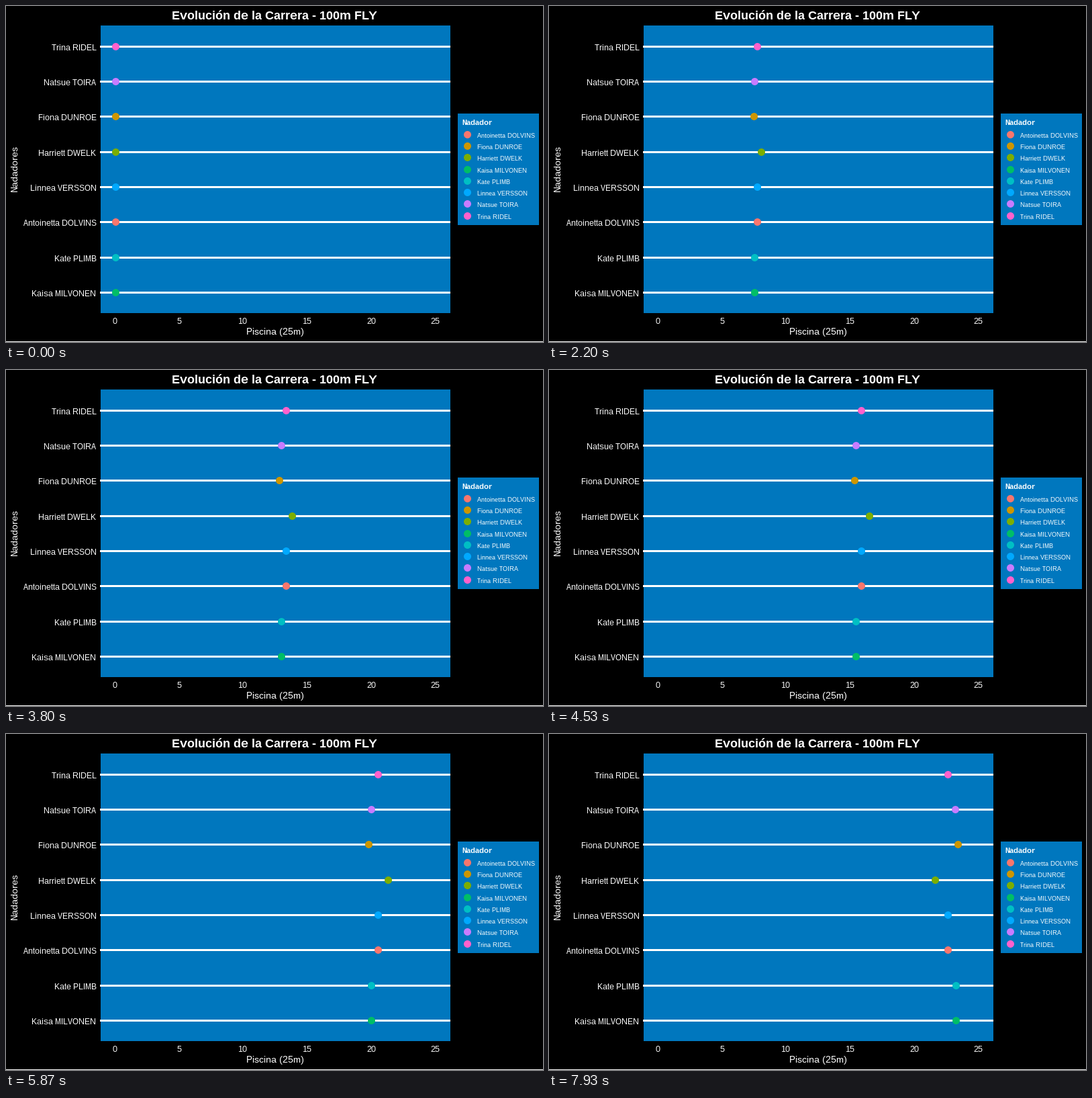
Animation, 800 px wide and 500 px high, one loop 8000 ms. Source, as a matplotlib script:

```python
import matplotlib.pyplot as plt
from matplotlib.animation import FuncAnimation
from matplotlib.patches import Circle, Rectangle

W, H, DPI = 800, 500, 100
LOOP, TICK = 8000, 20       # ms
STEP = LOOP / 120           # ms between two poses
WATER = "#0077BE"
START, WALL = 163.35, 639.45

plt.rcParams.update({
    "font.family": "Liberation Sans",
    "text.hinting": "native",
    "text.hinting_factor": 1,
})

# Legend order: name, colour, lane from the top, speed out, speed back (px per pose)
SWIMMERS = [
    ("Antoinetta DOLVINS", "#F8766D", 5, 4.442, 3.853),
    ("Fiona DUNROE", "#CD9600", 2, 4.282, 3.96),
    ("Harriett DWELK", "#7CAE00", 3, 4.615, 4.07),
    ("Kaisa MILVONEN", "#00BE67", 7, 4.322, 3.79),
    ("Kate PLIMB", "#00BFC4", 6, 4.322, 3.79),
    ("Linnea VERSSON", "#00A9FF", 4, 4.442, 3.853),
    ("Natsue TOIRA", "#C77CFF", 1, 4.322, 3.91),
    ("Trina RIDEL", "#FF61CC", 0, 4.442, 3.853),
]

fig = plt.figure(figsize=(W / DPI, H / DPI), dpi=DPI, facecolor="black")
ax = fig.add_axes([0, 0, 1, 1])
ax.set_xlim(0, W)
ax.set_ylim(H, 0)
ax.axis("off")


def box(x0, y0, x1, y1, color):
    ax.add_patch(Rectangle((x0, y0), x1 - x0, y1 - y0, fc=color, lw=0,
                           antialiased=False))


def label(x, y, text, px, ha="center", **kw):
    return ax.text(x, y, text, fontsize=px * 72 / DPI, color="white",
                   ha=ha, va="baseline", **kw)


def dot(x, y, color):
    return ax.add_patch(Circle((x + 0.5, y + 0.5), 5.5, fc=color, lw=0,
                               zorder=3))


def lane_y(lane):
    return int(60.3 + 52.3 * lane)


def position(pose, out, back):
    turn = (WALL - START) / out
    if pose <= turn:
        return START + out * pose
    return WALL - back * (pose - turn)


# Pool, axes and the light bottom edge
box(0, H - 1, W, H, "white")
box(141, 29, 662, 457, WATER)
label(400, 20, "Evolución de la Carrera - 100m FLY", 18, weight="bold")
label(400.5, 489, "Piscina (25m)", 14)
label(16.5, 242, "Nadadores", 14, rotation=90, rotation_mode="anchor")
for i in range(6):
    label(162.5 + 95.35 * i, 473, str(5 * i), 12)

# Legend
box(673, 160, 794, 326, WATER)
label(679, 177, "Nadador", 11, ha="left", weight="bold")

dots = []
for i, (name, color, lane, out, back) in enumerate(SWIMMERS):
    y = lane_y(lane)
    box(140, y - 1, 662, y + 2, "white")
    label(134.5, y + 6, name, 12, ha="right")
    dots.append(dot(round(START), y, color))

    key_y = 191.2 + 17.28 * i
    dot(687, int(key_y), color)
    label(702, round(key_y + 4.5), name, 9, ha="left")


def update(frame):
    # Poses last 66.7 ms, so they are held over several ticks
    pose = int((frame * TICK + 15) / STEP)
    for mark, (_, _, lane, out, back) in zip(dots, SWIMMERS):
        x = round(position(pose, out, back))
        mark.set_center((x + 0.5, lane_y(lane) + 0.5))
    return dots


anim = FuncAnimation(fig, update, frames=LOOP // TICK, interval=TICK,
                     repeat=True, repeat_delay=0)
plt.show()
```
